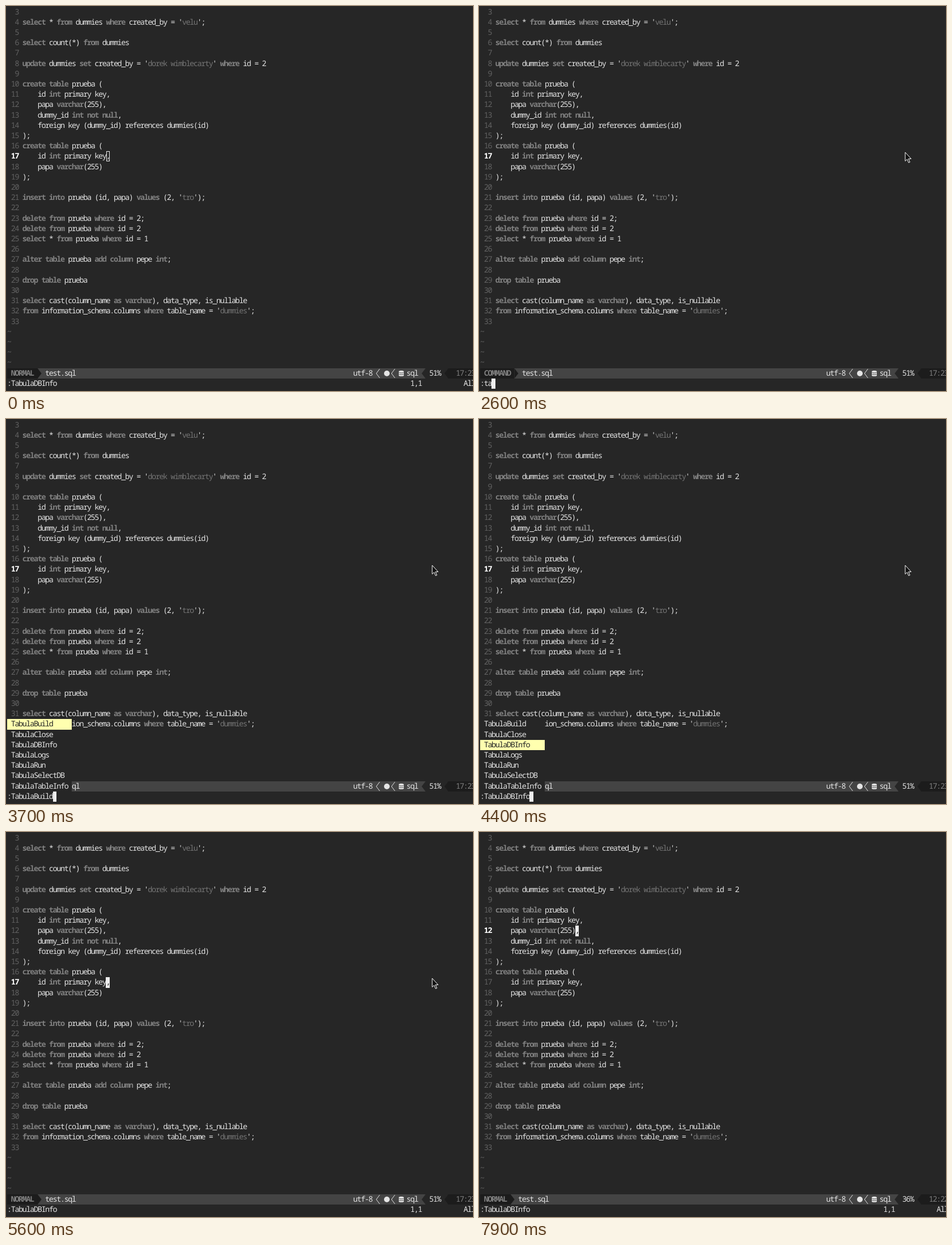
An HTML page that plays this animation: 824x679 px, repeating every 8 s.

```html
<!DOCTYPE html>
<html lang="en">
<head>
<meta charset="utf-8">
<title>SQL editor</title>
<style>
html, body { margin: 0; width: 100%; height: 100%; overflow: hidden; background: #262626; }
svg { display: block; width: 824px; height: 679px; }
text {
  font: 13.5px "Noto Sans Mono", "DejaVu Sans Mono", monospace;
  font-stretch: condensed;
  white-space: pre;
  text-rendering: geometricPrecision;
}
.b { font-weight: 700; }
rect { shape-rendering: crispEdges; }
</style>
</head>
<body>
<svg id="stage" viewBox="0 0 824 679"></svg>
<script>
const stage = document.getElementById('stage');
const W = 6.71, H = 18.2, LOOP = 8000;
const BG = '#262626', FG = '#e4e4e4', KEY = '#808080', STR = '#747474', NUM = '#626262';
const BAR = '#444444', DARK = '#1c1c1c';

const code = `
select * from dummies where created_by = 'velu';

select count(*) from dummies

update dummies set created_by = 'dorek wimblecarty' where id = 2

create table prueba (
    id int primary key,
    papa varchar(255),
    dummy_id int not null,
    foreign key (dummy_id) references dummies(id)
);
create table prueba (
    id int primary key,
    papa varchar(255)
);

insert into prueba (id, papa) values (2, 'tro');

delete from prueba where id = 2;
delete from prueba where id = 2
select * from prueba where id = 1

alter table prueba add column pepe int;

drop table prueba

select cast(column_name as varchar), data_type, is_nullable
from information_schema.columns where table_name = 'dummies';
`.split('\n');
const FIRST = 3, LAST = FIRST + code.length - 1;
const keywords = 'select|from|where|update|set|create|table|int|varchar|not|null|insert|into|values|delete|alter|add|column|drop|as';
const syntax = new RegExp(`'([^']*)'|\\b(${keywords})\\b`, 'g');
const menu = ['Build', 'Close', 'DBInfo', 'Logs', 'Run', 'SelectDB', 'TableInfo'].map(s => 'Tabula' + s);

// Grid helpers
const X = col => 2 + W * col;
const Y = row => Math.round(1.6 + H * row);
const text = (col, row, s, fill = FG, cls = '') =>
  `<text class="${cls}" x="${X(col)}" y="${Y(row) + 13}" fill="${fill}">${s}</text>`;
const box = (x, y, w, h, fill) => `<rect x="${x}" y="${y}" width="${w}" height="${h}" fill="${fill}"/>`;
const cells = (col, row, n, fill, rows = 1) =>
  box(X(col), Y(row), W * n, Y(row + rows) - Y(row), fill);
const path = (x, y, d, fill, line = 'none', width = 1) =>
  `<path transform="translate(${x} ${y})" d="${d}" fill="${fill}" stroke="${line}" stroke-width="${width}"/>`;

const paint = s => s.replace(syntax, (m, str, key) => key
  ? `<tspan class="b" fill="${KEY}">${key}</tspan>`
  : `'<tspan fill="${STR}">${str}</tspan>'`);

function editor(line) {
  let out = '';
  code.forEach((s, i) => {
    const n = FIRST + i, here = n === line;
    out += text(0, i, String(n).padStart(3), here ? '#ffffff' : NUM, here ? 'b' : '') + text(4, i, paint(s));
  });
  for (let r = code.length; r < 35; r++) out += text(0, r, '~', NUM);
  return out;
}

function block(col, row, ch, focused = true) {
  if (focused) return cells(col, row, 1, '#eeeeee') + text(col, row, ch, BG);
  return `<rect x="177.5" y="${Y(row) + .5}" width="5" height="17" fill="none" stroke="#eeeeee"/>`;
}

function status(mode, line, col) {
  const y = Y(35), end = mode.length + 2;
  const right = 'M0 0L7 9L0 18z', left = 'M7 0L0 9L7 18z', thin = 'M6.5 1L.5 9L6.5 17';
  return cells(0, 35, 123, BAR)
    + cells(0, 35, end, DARK) + path(X(end), y, right, DARK)
    + text(1, 35, mode, KEY, 'b') + text(end + 2, 35, 'test.sql')
    + text(91, 35, 'utf-8')
    + path(X(97), y, thin, 'none', FG) + path(X(101), y, thin, 'none', FG)
    + `<circle cx="672" cy="${y + 9}" r="5" fill="${FG}"/>`
    + path(693, y + 4, 'M0 1.5C0-.5 9-.5 9 1.5V8.5C9 10.5 0 10.5 0 8.5z', FG)
    + path(693, y + 4, 'M0 3C1 4.5 8 4.5 9 3M0 6C1 7.5 8 7.5 9 6', 'none', BAR)
    + text(105, 35, 'sql')
    + path(X(109), y, left, BG) + cells(110, 35, 6, BG)
    + text(111, 35, Math.floor(line / LAST * 100) + '%')
    + path(X(115), y, left, DARK) + cells(116, 35, 8, DARK)
    + text(118, 35, line + ':' + col, KEY);
}

const footer = () => text(0, 36, ':TabulaDBInfo') + text(106, 36, '1,1') + text(120, 36, 'All');

function commandLine(t) {
  const pick = t >= 4400 ? 2 : t >= 4200 ? 1 : t >= 3700 ? 0 : -1;
  const typed = [2500, 2600, 2800, 2900, 3100, 3300].filter(k => t >= k).length;
  const cmd = ':' + (pick < 0 ? 'tabula'.slice(0, typed) : menu[pick]);
  let out = text(0, 36, cmd) + block(cmd.length, 36, '');
  if (pick >= 0) {
    out += cells(0, 29, 17, BG, 7);
    menu.forEach((s, i) => {
      if (i === pick) out += cells(0, 29 + i, 17, '#ffffaf');
      out += text(1, 29 + i, s, i === pick ? BG : FG);
    });
  }
  return out;
}

function popup() {
  const rows = { NAME: 'PostgreSQL', HOST: 'localhost', PORT: '5432', 'DB NAME': 'db_dummy', USER: 'guest', PASSWORD: 'guest' };
  let out = cells(42, 12, 39, BG, 10)
    + path(0, 0, 'M344 228.5H287V392H378M459 392H542V228.5H485', 'none', '#eeeeee', 2)
    + path(351, 223, 'M.5 .5H11.5V10.5H.5zM.5 2H11.5M.5 5H11.5M.5 8H11.5M4 .5V10.5M8 .5V10.5', 'none', FG)
    + text(55, 12, 'TABULA - DB Info', FG, 'b')
    + text(57, 21, 'PostgreSQL', STR)
    + cells(44, 13, 1, KEY) + path(X(44), Y(13), 'M2 5h3v1h-3zM2 9h2v3h-2zM4 12h2v2h-2z', BG)
    + text(46, 13, 'Connection Data', KEY, 'b');
  Object.entries(rows).forEach(([name, value], i) => {
    const r = 14 + i;
    out += text(44, r, name) + text(55, r, value)
      + path(358, Y(r) + 9, 'M0 0H8M4.5-3.5L8 0L4.5 3.5', 'none', FG, 1.8);
  });
  return out;
}

const arrow = (x, y) => path(x, y, 'M1 1V16.5L4.5 13.3L7 19.3L9.3 18.3L6.8 12.5H11.5z', '#111111', '#ffffff');
const iBeam = (x, y) => ['#ffffff', '#111111'].map((c, i) =>
  path(x, y, 'M-3-8H-1L0-7L1-8H3M0-7V7M-3 8H-1L0 7L1 8H3', 'none', c, i ? 1 : 3)).join('');

function pointer(t) {
  if (t < 500 || t >= 6200) return '';
  if (t < 600) return arrow(785, 261);
  return t >= 2000 && t < 2100 ? iBeam(751, 257.5) : arrow(751, 257);
}

function frame(t) {
  const line = t < 7200 ? 17 : t < 7800 ? 16 : t < 7900 ? 14 : 12;
  const src = code[line - FIRST], col = Math.min(23, src.length);
  let out = editor(line);
  if (t >= 2100 && t < 4700) out += status('COMMAND', line, col) + commandLine(t);
  else if (t >= 4700 && t < 5600)
    out += cells(0, 35, 123, BAR) + text(1, 35, 'test.sql') + text(118, 35, '17:23') + footer() + popup();
  else out += block(col + 3, line - FIRST, src[col - 1], t >= 500) + status('NORMAL', line, col) + footer();
  return out + pointer(t);
}

// Fit the font's advance to the grid
stage.innerHTML = text(0, 0, 'x'.repeat(100));
const advance = stage.firstChild.getComputedTextLength() / 100;
stage.style.letterSpacing = W - advance + 'px';

let shown = '';
function tick(now) {
  const next = frame(now % LOOP);
  if (next !== shown) stage.innerHTML = shown = next;
  requestAnimationFrame(tick);
}
tick(performance.now());
</script>
</body>
</html>
```
